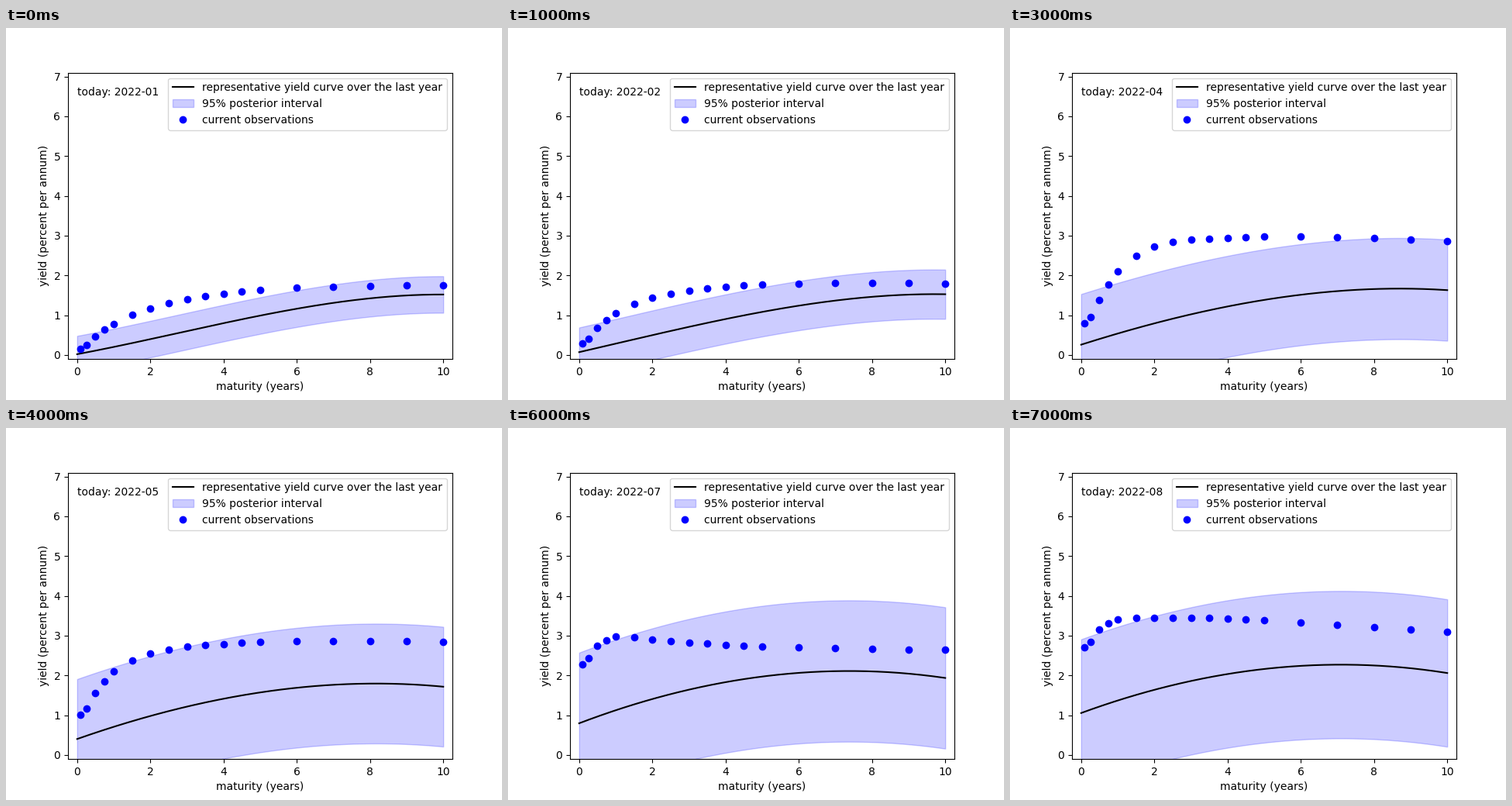
These frames come from a looping animation (640 by 480 pixels, 8000 ms). A matplotlib script:

```python
import numpy as np
import matplotlib.pyplot as plt
from matplotlib.animation import FuncAnimation

MONTHS = 8
MATURITIES = np.r_[1 / 12, 0.25:1:0.25, 1:5:0.5, 5:11]

# Observed yields, one row per month, at a few key maturities
KEYS = [1 / 12, 0.5, 1, 2, 4, 10]
YIELDS = [
    [.16, .47, .78, 1.17, 1.54, 1.755],
    [.29, .675, 1.05, 1.435, 1.71, 1.79],
    [.40, 1.025, 1.69, 2.355, 2.51, 2.28],
    [.80, 1.38, 2.10, 2.73, 2.945, 2.865],
    [1.02, 1.55, 2.10, 2.55, 2.79, 2.84],
    [1.61, 2.37, 2.86, 2.94, 3.03, 2.92],
    [2.27, 2.74, 2.97, 2.90, 2.77, 2.64],
    [2.71, 3.15, 3.41, 3.445, 3.425, 3.095],
]

# Representative curve: a cubic in both time and maturity
CURVE_MONTHS = [0, 2, 5, 7]
CURVE_KEYS = [0, 3, 7, 10]
CURVES = np.array([
    [.02, .60, 1.31, 1.52],
    [.15, .85, 1.47, 1.565],
    [.58, 1.425, 1.935, 1.82],
    [1.055, 1.86, 2.27, 2.06],
])

fig, ax = plt.subplots(figsize=(6.4, 4.8), dpi=100)
x = np.linspace(0, 10, 200)


def cubic(xs, ys, at):
    return np.polyval(np.polyfit(xs, ys, 3), at)


def mean_curve(month):
    levels = [cubic(CURVE_MONTHS, column, month) for column in CURVES.T]
    return cubic(CURVE_KEYS, levels, x)


def half_width(month):
    return 0.46 + 1.66 * month**2 / (month**2 + 9.4)


def observations(month):
    """Hermite spline over log maturity, flat at the short end."""
    u, v = np.log1p(KEYS), np.log1p(MATURITIES)
    y = np.array(YIELDS[month])
    slope = np.gradient(y, u, edge_order=2)
    slope[0] = 0
    i = np.clip(np.searchsorted(u, v) - 1, 0, len(u) - 2)
    h = u[i + 1] - u[i]
    s = (v - u[i]) / h
    ease = s * s * (3 - 2 * s)
    bend = s * (1 - s) * ((1 - s) * slope[i] - s * slope[i + 1])
    return y[i] + ease * (y[i + 1] - y[i]) + h * bend


def draw(month):
    ax.clear()
    mean, half = mean_curve(month), half_width(month)
    ax.plot(x, mean, "k", label="representative yield curve over the last year")
    ax.fill_between(x, mean - half, mean + half, color="b", alpha=0.2,
                    label="95% posterior interval")
    ax.plot(MATURITIES, observations(month), "bo", label="current observations")
    ax.text(0, 6.517, f"today: 2022-{month + 1:02d}")
    ax.set(xlim=(-0.25, 10.25), ylim=(-0.103, 7.097),
           xlabel="maturity (years)", ylabel="yield (percent per annum)")
    ax.legend(loc="upper right")


anim = FuncAnimation(fig, draw, frames=MONTHS, interval=1000,
                     init_func=lambda: draw(0), repeat=True, repeat_delay=0)
plt.show()
```
